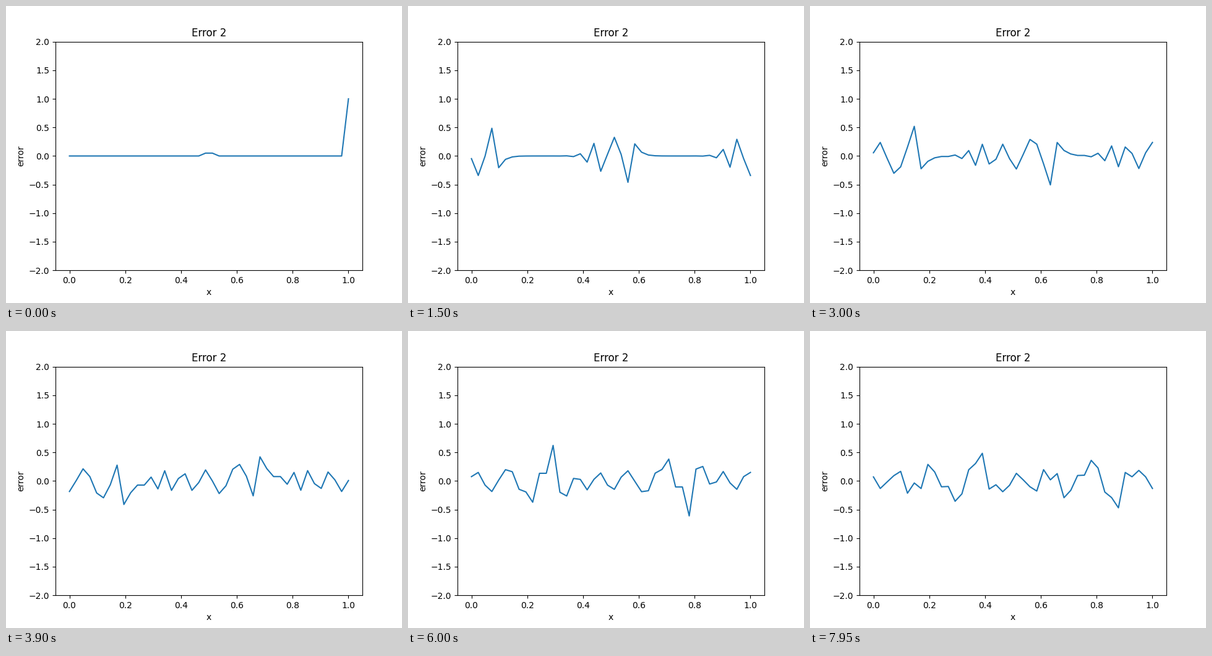
These frames come from a looping animation (640x480 px, 8000 ms). A matplotlib script:

```python
import numpy as np
import matplotlib.pyplot as plt
from matplotlib.animation import FuncAnimation

CELLS = 40          # periodic cells, plus one ghost point at each end
TENTHS = 10         # time steps needed to travel one cell
COURANT = 1 / TENTHS
FRAMES = 160

index = np.arange(CELLS + 2)
x = np.linspace(0, 1, CELLS + 2)


def centred(u):
    return u[2:] - u[:-2]


def wrap(u):
    u[0], u[-1] = u[-2], u[1]
    return u


def exact(step):
    """Square pulse carried along at constant speed."""
    shift = step // TENTHS
    return ((index > shift) & (index <= shift + CELLS // 2)).astype(float)


def solve(steps):
    """Leapfrog advection, started with one forward Euler step."""
    old = (index <= CELLS // 2).astype(float)
    now = old.copy()
    now[1:-1] -= COURANT / 2 * centred(old)
    wrap(now)
    history = [now]
    for _ in range(steps - 1):
        new = old.copy()
        new[1:-1] -= COURANT * centred(now)
        old, now = now, wrap(new)
        history.append(now)
    return history


errors = [u - exact(n) for n, u in enumerate(solve(FRAMES), start=1)]

fig, ax = plt.subplots(figsize=(6.4, 4.8), dpi=100)
line, = ax.plot(x, errors[0])
ax.set_ylim(-2, 2)
ax.set_title("Error 2")
ax.set_xlabel("x")
ax.set_ylabel("error")


def update(frame):
    line.set_ydata(errors[frame])
    return line,


anim = FuncAnimation(fig, update, frames=FRAMES, interval=50,
                     init_func=lambda: update(0), repeat=True, repeat_delay=0)
plt.show()
```
